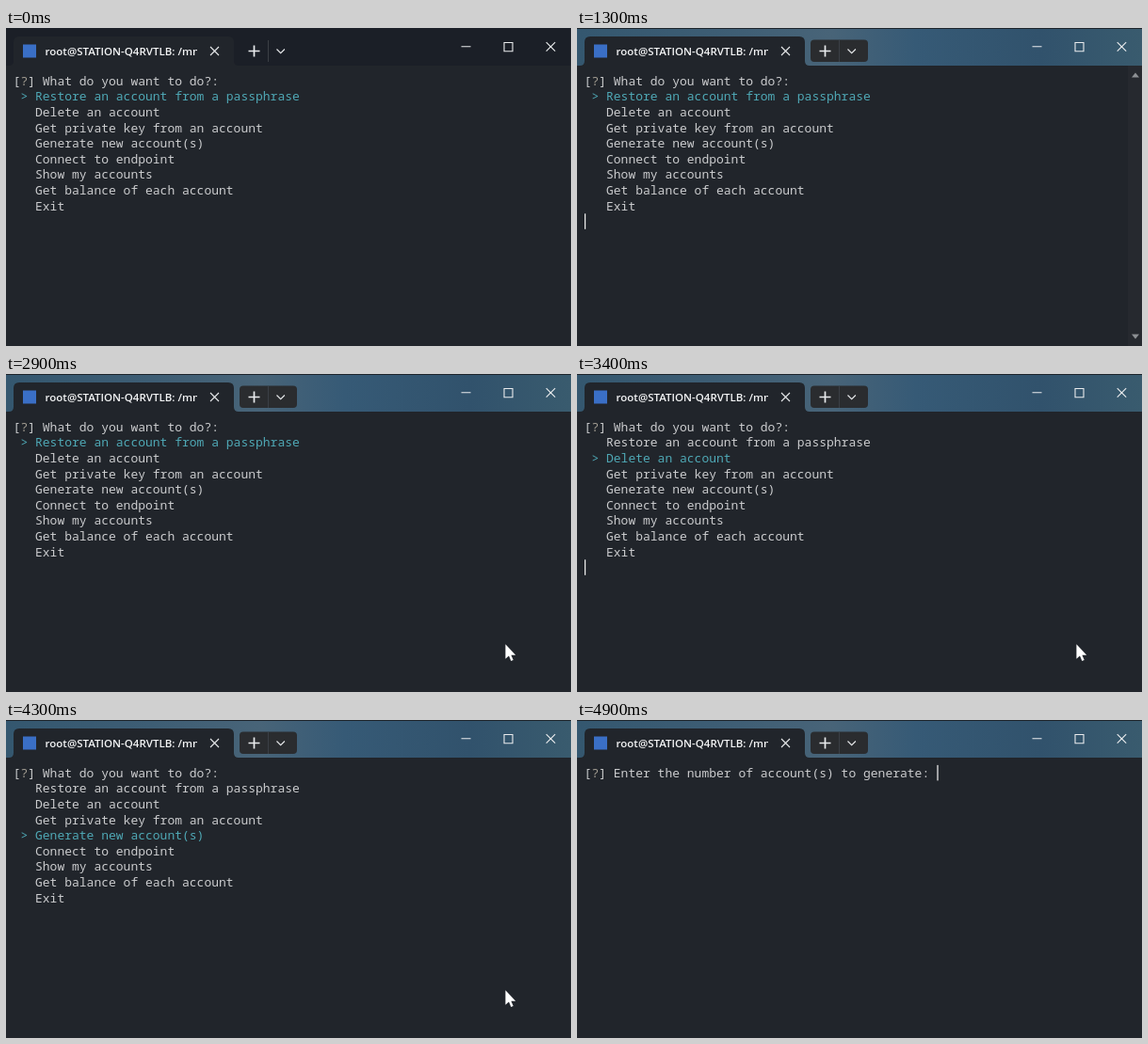
An HTML page that plays this animation: 600x338 px, repeating every 5000 ms.

```html
<!DOCTYPE html>
<html lang="en">
<head>
<meta charset="utf-8">
<title>Terminal menu</title>
<style>
  html, body { margin: 0; width: 100%; height: 100%; overflow: hidden; background: #21252b; }
  svg { display: block; width: 100vw; height: 100vh; }
  .mono { font: 500 13px "Noto Sans Mono", "DejaVu Sans Mono", monospace; fill: #cbccce; white-space: pre; }
  .mono .on { fill: #4fa8b5; }
  .mono .mark { fill: #a39d92; }
  .title { font: 600 11.5px "Open Sans", "Noto Sans", sans-serif; fill: #f4f5f6; }
  .line { fill: none; stroke: #e9ebed; stroke-width: 1.1; }
  .bold { stroke-width: 1.7; }
</style>
</head>
<body>
<svg viewBox="0 0 600 338" preserveAspectRatio="none">
  <defs>
    <linearGradient id="glass">
      <stop offset="0" stop-color="#34576f"/>
      <stop offset=".25" stop-color="#3d5d74"/>
      <stop offset=".45" stop-color="#486478"/>
      <stop offset=".6" stop-color="#365a76"/>
      <stop offset=".82" stop-color="#31526c"/>
      <stop offset="1" stop-color="#395b6e"/>
    </linearGradient>
    <clipPath id="titleClip"><rect x="40" y="10" width="163" height="28"/></clipPath>
  </defs>

  <rect width="600" height="338" fill="#21252b"/>
  <rect width="600" height="40" fill="#1b1f27"/>
  <g id="focus">
    <rect width="600" height="40" fill="url(#glass)"/>
    <rect width="600" height="1" fill="#1d242b"/>
    <rect x="248" y="12.5" width="61" height="23.5" rx="4" fill="#2a2c2f"/>
  </g>
  <path d="M3 40Q8 40 8 35V15Q8 9 14 9H236Q242 9 242 15V35Q242 40 247 40Z" fill="#21252b"/>
  <path d="M278.5 13V36" stroke="#3b3f45"/>

  <rect x="18" y="17.5" width="14" height="14" fill="#3a6fc6"/>
  <g clip-path="url(#titleClip)">
    <text class="title" x="41.6" y="28.8">root@STATION-Q4RVTLB: /mnt</text>
  </g>
  <path class="line" d="M217 20l9 9m0-9l-9 9"/>
  <path class="line bold" d="M257.5 24.5h12m-6-6v12"/>
  <path class="line" d="M287.5 22.5l4.2 4.2 4.2-4.2"/>
  <path class="line" d="M483.5 19.7h10M529 15.5h9v9.2h-9zM573.7 15.2l9.5 9.5m0-9.5l-9.5 9.5"/>

  <g id="bar">
    <rect x="585" y="40" width="15" height="298" fill="#26292f"/>
    <path d="M589 52.5h8l-4-5zM589 325.5h8l-4 5z" fill="#8d9094"/>
  </g>

  <g id="menu" class="mono"></g>
  <g id="ask" class="mono"></g>
  <rect id="caret" width="1.2" height="16.5" fill="#f2f2f2"/>
  <path id="mouse" d="M530.4 287.2v15.6l3.6-3.2 2.3 5.3 2.4-1-2.3-5.2h4.8z" fill="#fff"/>
</svg>
<script>
  const LOOP = 5000, LEFT = 7.6, CELL = 7.8, TOP = 60.7, PITCH = 16.6;
  const OPTIONS = [
    'Restore an account from a passphrase', 'Delete an account',
    'Get private key from an account', 'Generate new account(s)',
    'Connect to endpoint', 'Show my accounts',
    'Get balance of each account', 'Exit'
  ];
  // Each table holds [start time in ms, value].
  const STEPS = {
    pick: [[0, 0], [3400, 1], [3600, 2], [3800, 3]],
    caret: [[0, 0], [1200, 1], [1800, 0], [2300, 1], [2900, 0], [3400, 1], [4300, 0], [4800, 1]],
    bar: [[0, 0], [700, 1], [1400, .65], [1500, .3], [1600, 0]],
    focus: [[0, 0], [1300, 1]],
    mouse: [[0, 0], [1400, 1], [4900, 0]],
    ask: [[0, 0], [4900, 1]]
  };

  const $ = id => document.getElementById(id);
  const at = (name, t) => STEPS[name].findLast(step => step[0] <= t)[1];
  const show = (id, value) => $(id).setAttribute('opacity', value);

  function write(parent, col, row, text, cls = '') {
    const el = document.createElementNS('http://www.w3.org/2000/svg', 'text');
    el.setAttribute('x', LEFT + col * CELL);
    el.setAttribute('y', TOP + row * PITCH);
    el.setAttribute('class', cls);
    el.textContent = text;
    return parent.appendChild(el);
  }

  function question(parent, text) {
    write(parent, 0, 0, '[');
    write(parent, 1, 0, '?', 'mark');
    write(parent, 2, 0, ']');
    write(parent, 4, 0, text);
  }

  const PROMPT = 'Enter the number of account(s) to generate:';
  question($('menu'), 'What do you want to do?:');
  question($('ask'), PROMPT);
  const rows = OPTIONS.map((text, i) => write($('menu'), 3, i + 1, text));
  const arrow = write($('menu'), 1, 1, '>', 'on');

  function draw(t) {
    const pick = at('pick', t), asking = at('ask', t);
    rows.forEach((row, i) => row.setAttribute('class', i === pick ? 'on' : ''));
    arrow.setAttribute('y', TOP + (pick + 1) * PITCH);
    for (const id of ['caret', 'bar', 'focus', 'mouse', 'ask']) show(id, at(id, t));
    show('menu', 1 - asking);
    const col = asking ? PROMPT.length + 5 : 0;
    const row = asking ? 0 : OPTIONS.length + 1;
    $('caret').setAttribute('x', LEFT + col * CELL + .4);
    $('caret').setAttribute('y', TOP + row * PITCH - 12.8);
  }

  function tick() {
    draw(performance.now() % LOOP);
    requestAnimationFrame(tick);
  }
  tick();
</script>
</body>
</html>
```
